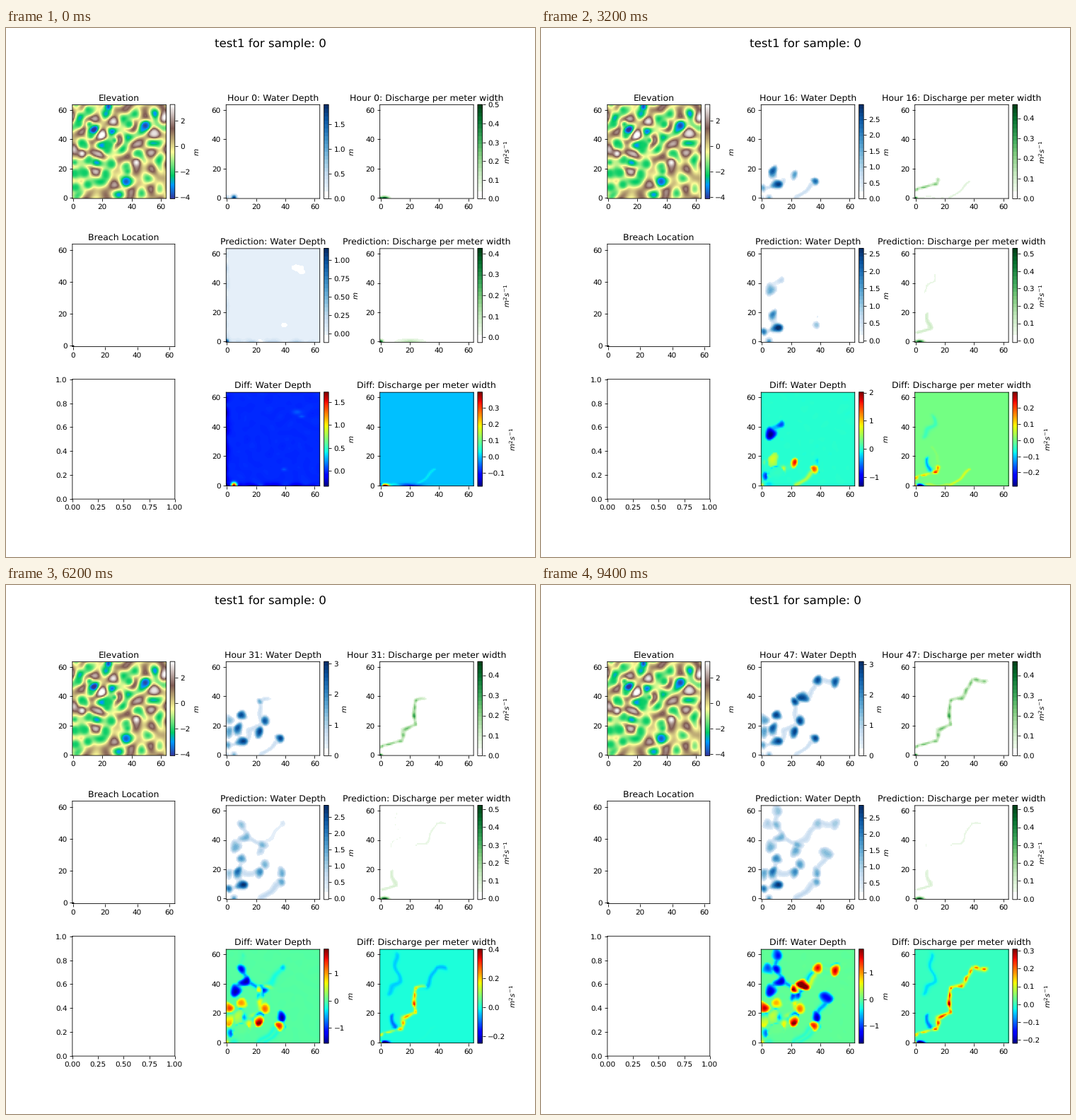
Write a matplotlib script that moves like this. It is 748x748 px and loops after 9.6 s.

```python
import numpy as np
import matplotlib.pyplot as plt
from matplotlib.animation import FuncAnimation
from matplotlib.colors import ListedColormap

plt.rcParams.update({"text.hinting": "no_hinting", "path.snap": False})

N = 64
HOURS = 48
Y, X = np.mgrid[0:N, 0:N].astype(float)
rng = np.random.default_rng(7)


def ripple(freq, band):
    """Random field of unit spread with one dominant wavelength."""
    f = np.fft.fftfreq(N)
    k = np.hypot(f[:, None], f[None, :])
    spec = np.fft.fft2(rng.normal(size=(N, N)))
    field = np.fft.ifft2(spec * np.exp(-((k - freq) / band) ** 2)).real
    return field / field.std()


WX, WY = X + 0.7 * ripple(0.07, 0.03), Y + 0.7 * ripple(0.07, 0.03)
GRAIN = ripple(0.1, 0.05)


def spot(x, y, rx, ry=None):
    return np.exp(-((X - x) / rx) ** 2 - ((Y - y) / (ry or rx)) ** 2)


def pulse(hour, peak, width):
    return np.exp(-((hour - peak) / width) ** 2)


# Hollows in the order in which the water reaches them.
TRUE_PONDS = [(10, 9), (8, 17), (1, 7), (36, 11), (22, 15), (1, 16), (10, 26),
              (26, 23), (1, 24), (23, 36), (28, 39), (38, 50), (50, 49)]
MODEL_PONDS = [(10, 9), (7, 36), (2, 7), (8, 17), (37, 11), (12, 42),
               (37, 18), (22, 17), (25, 36), (11, 50), (10, 26), (26, 23),
               (1, 17), (23, 32), (38, 50), (10, 60), (4, 50), (44, 30),
               (50, 50)]


def make_terrain():
    land = 1.3 * ripple(0.085, 0.022)
    for x, y in TRUE_PONDS + MODEL_PONDS:
        w = spot(x, y, 3)
        land = land * (1 - w) - 2.2 * w
    for x, y, height in [(6, 30, 3.3), (43, 24, 3.3), (55, 44, 3),
                         (24, 62, -4), (49, 49, -4), (36, 11, -3.7)]:
        w = spot(x, y, 3)
        land = land * (1 - w) + height * w
    return np.clip(land, -4.15, 3.3)


# ---- streams and ponds ----
def trace(*points):
    """Distance to a polyline and arc length of the nearest point."""
    px, py = np.array(points, float).T
    cum = np.r_[0, np.cumsum(np.hypot(np.diff(px), np.diff(py)))]
    s = np.linspace(0, cum[-1], 200)
    d2 = ((WX[..., None] - np.interp(s, cum, px)) ** 2
          + (WY[..., None] - np.interp(s, cum, py)) ** 2)
    return np.sqrt(d2.min(-1)), s[d2.argmin(-1)]


def stream(line, width, front=999):
    d, s = line
    return np.exp(-(d / width) ** 2) * np.clip((front - s) / 3, 0, 1)


def make_basins(ponds, last, ease, depth_rule):
    """Bowl, channel to the nearest earlier pond, depth and first hour."""
    basins = []
    for i, (x, y) in enumerate(ponds):
        bowl = ((WX - x) ** 2 + (WY - y) ** 2) / 4.4 ** 2
        near = min(ponds[:i], default=None,
                   key=lambda p: np.hypot(p[0] - x, p[1] - y))
        link = 0
        if near and np.hypot(near[0] - x, near[1] - y) < 20:
            link = stream(trace(near, (x, y)), 1.8)
        start = last * (i / (len(ponds) - 1)) ** ease
        depth = depth_rule(x, y) * min(1, 0.55 + x / 22)
        basins.append((bowl, link, depth, start))
    return basins


def fill(basins, hour, link_depth):
    water = np.zeros((N, N))
    for bowl, link, depth, start in basins:
        level = 1 - np.exp(-max(0, hour - start) / 4)
        water = np.maximum(water, depth * (level - bowl))
        water = np.maximum(water, link_depth * level * link)
    return water


MAIN = trace((0, 5), (3, 7), (8, 8), (13, 9.5), (16, 17), (23, 20),
             (22.5, 28), (23, 34), (25, 37), (30, 39), (36, 45), (38, 50),
             (48, 50))
FORK = trace((16, 17), (16, 20), (11, 25))
SIDE = trace((23, 0), (30, 5), (36, 11))
EDGE = trace((0, 0), (23, 0))
M_MAIN = trace((1, 6), (9, 8.5), (9, 12), (8, 17))
M_LEFT = trace((7, 35), (12, 42), (11, 50), (10, 60))
M_EAST = trace((25, 36), (30, 38), (38, 50), (44, 50.5))

terrain = make_terrain()
true_basins = make_basins(TRUE_PONDS, 37, 1, lambda x, y: 2.9)
model_basins = make_basins(MODEL_PONDS, 35, 0.75, lambda x, y:
                           1 + 3.4 * np.exp(-np.hypot(x, y) / 22))


def front(hour):
    return 78 * min(1, hour / 40) ** 1.5


def true_depth(h):
    side = 0.7 * min(1, h / 9) * stream(SIDE, 1.4)
    return np.maximum.reduce([
        fill(true_basins, h, 0.15), side,
        0.7 * stream(MAIN, 1.6, front(h)),
        (1.5 + 0.4 * np.exp(-h)) * spot(5, 0, 1.9),
        0.7 * spot(0, 0, 1.8)])


def model_depth(h):
    late = np.clip((h - 14) / 16, 0, 1)
    water = np.maximum.reduce([
        fill(model_basins, h, 0.7),
        0.8 * late * stream(SIDE, 2),
        1.7 * min(1, h / 4) * spot(5, 0, 2),
        0.7 * pulse(h, 9, 3) * spot(11, 49, 1.8, 2.5)])
    rim = 0.13 * (np.exp(-Y) + np.exp(-X)) * (1 + 0.6 * GRAIN)
    dry = spot(48, 50, 3, 1.6) + spot(51, 47, 2, 1) + spot(39, 11, 1.6, 1)
    early = rim + 1.1 * spot(0, 0, 1.4) - 0.1 * dry
    return water + np.exp(-h / 1.2) * early + 0.004 * GRAIN


def true_flow(h):
    s = MAIN[1]
    power = 0.2 + 0.06 * np.sin(1.1 * s) + 0.14 * pulse(s, 37, 2)
    return np.maximum.reduce([
        power * stream(MAIN, 1.2, front(h)),
        0.15 * pulse(h, 22, 4) * stream(FORK, 1),
        0.09 * pulse(h, 12, 11) * stream(SIDE, 0.8),
        0.11 * pulse(h, 9, 8) * stream(EDGE, 0.7),
        0.5 * np.exp(-h) * spot(2.5, 0, 3, 1),
        0.4 * spot(0, 0, 1.1, 0.8)])


def model_flow(h):
    east = 0.05 * np.clip((h - 22) / 9, 0, 1)
    return np.maximum.reduce([
        (0.08 + 0.08 * np.exp(-h / 25)) * stream(M_MAIN, 1.3, 1.5 * h),
        0.04 * stream(M_LEFT, 1.6, h),
        east * stream(M_EAST, 1.2),
        0.12 * np.exp(-h / 1.2) * spot(20, 0, 7, 1.2),
        0.42 * np.exp(-h) * spot(0, 0, 1.4, 1),
        0.53 * min(1, h / 3) * spot(2.5, 0, 2.8, 0.9)])


# ---- colour limits ----
KEYS = [0, 9, 16, 23, 31, 40, 47]


def keyed(h, *values):
    return np.interp(h, KEYS, values)


def limits(h):
    return {
        "depth": (0, 3.08 - 1.18 * np.exp(-h / 7)),
        "flow": (0, 0.468 + 0.033 * np.exp(-h)),
        "m_depth": (-0.02 - 0.106 * np.exp(-h / 18),
                    2.9 - 1.74 * np.exp(-h / 8)),
        "m_flow": (-0.004 - 0.022 * np.exp(-h / 14),
                   0.523 + 0.064 * pulse(h, 9, 5) - 0.1 * np.exp(-h / 2)),
        "d_depth": (keyed(h, -.34, -.89, -1.33, -1.31, -1.56, -1.63, -1.66),
                    keyed(h, 1.72, 2.21, 2.02, 2.39, 1.88, 1.85, 1.9)),
        "d_flow": (keyed(h, -.18, -.304, -.286, -.271, -.25, -.256, -.22),
                   keyed(h, .394, .216, .299, .302, .402, .294, .31)),
    }


def banded(name):
    """Sequential map in 24 bands, lightest ones plain white."""
    colors = plt.get_cmap(name)(np.linspace(0, 1, 24))
    colors[:2] = 1
    return ListedColormap(colors)


# ---- figure ----
fig, axs = plt.subplots(3, 3, figsize=(10, 10), dpi=74.8)
fig.subplots_adjust(left=0.1255, right=0.9005, bottom=0.1095, top=0.8795,
                    wspace=0.5)
fig.suptitle("test1 for sample: 0", fontsize=16)
DEPTH_UNIT, FLOW_UNIT = "$m$", "$m^2s^{-1}$"


def panel(ax, title, cmap, unit, data=np.zeros((N, N)), vmin=0, vmax=1):
    im = ax.imshow(data, cmap=cmap, origin="lower", vmin=vmin, vmax=vmax)
    ax.set_title(title)
    if unit:
        fig.colorbar(im, ax=ax, fraction=0.046, pad=0.04, label=unit)
    return im


panel(axs[0, 0], "Elevation", "terrain", DEPTH_UNIT, terrain, -4.15, 3.3)
breach = np.zeros((N, N))
breach[0, 0] = 1
panel(axs[1, 0], "Breach Location", "binary", None, breach)

DEPTH, FLOW = "Water Depth", "Discharge per meter width"
blues, greens = banded("Blues"), banded("Greens")
images = {
    "depth": panel(axs[0, 1], "", blues, DEPTH_UNIT),
    "flow": panel(axs[0, 2], "", greens, FLOW_UNIT),
    "m_depth": panel(axs[1, 1], f"Prediction: {DEPTH}", blues, DEPTH_UNIT),
    "m_flow": panel(axs[1, 2], f"Prediction: {FLOW}", greens, FLOW_UNIT),
    "d_depth": panel(axs[2, 1], f"Diff: {DEPTH}", "jet", DEPTH_UNIT),
    "d_flow": panel(axs[2, 2], f"Diff: {FLOW}", "jet", FLOW_UNIT),
}


def update(h):
    depth, flow = true_depth(h), true_flow(h)
    m_depth, m_flow = model_depth(h), model_flow(h)
    fields = {"depth": depth, "flow": flow,
              "m_depth": m_depth, "m_flow": m_flow,
              "d_depth": depth - m_depth, "d_flow": flow - m_flow}
    bounds = limits(h)
    for key, field in fields.items():
        images[key].set_data(field)
        images[key].set_clim(*bounds[key])
    axs[0, 1].set_title(f"Hour {h}: {DEPTH}")
    axs[0, 2].set_title(f"Hour {h}: {FLOW}")
    return list(images.values())


anim = FuncAnimation(fig, update, frames=HOURS, interval=200,
                     repeat=True, repeat_delay=0, blit=False)
plt.show()
```
